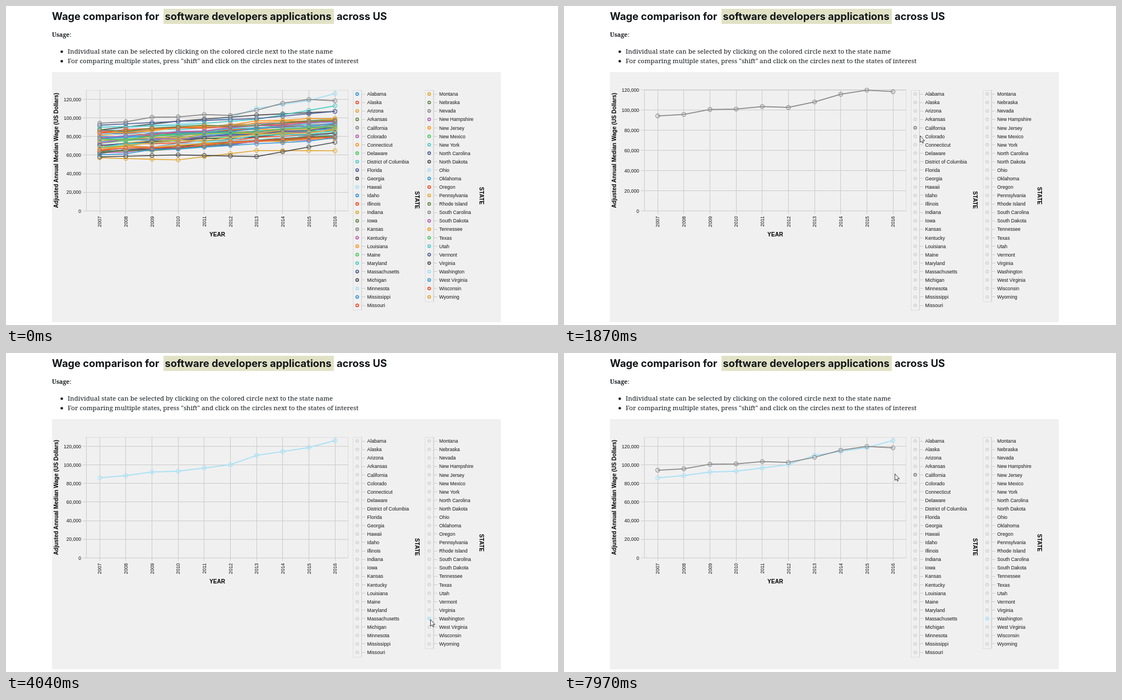
Animation of 985x569 px, one loop 8000 ms. Source, as an HTML page:

```html
<!DOCTYPE html>
<html lang="en">
<head>
<meta charset="utf-8">
<title>Wage comparison</title>
<style>
  html, body { margin: 0; width: 100%; height: 100%; overflow: hidden; background: #fff; }
  svg { display: block; width: 985px; height: 569px; }
  .title { font: 700 18.3px Inter, sans-serif; fill: #111418; }
  .body { font: 11.53px "Noto Serif", serif; fill: #16181c; }
  .usage { font: 700 10.6px "Noto Serif", serif; }
  .label { font: 8.6px "Liberation Sans", Arial, sans-serif; fill: #151515; }
  .axis { font: 700 10px "Liberation Sans", Arial, sans-serif; fill: #000; text-anchor: middle; }
  .end { text-anchor: end; }
  .grid { stroke: #cbcbcb; fill: none; }
  .frame { stroke: #ddd; fill: none; }
</style>
</head>
<body>
<svg viewBox="0 0 985 569">
  <rect x="281" y="5" width="304" height="27" fill="#e1e2c5"/>
  <g class="title">
    <text x="82" y="24.5">Wage comparison for</text>
    <text x="283.5" y="24.5">software developers applications</text>
    <text x="590" y="24.5">across US</text>
  </g>
  <g class="body">
    <text x="82" y="54.5"><tspan class="usage">Usage</tspan>:</text>
    <circle cx="99.5" cy="81.5" r="2.3"/>
    <text x="110" y="84.5">Individual state can be selected by clicking on the colored circle next to the state name</text>
    <circle cx="99.5" cy="98.5" r="2.3"/>
    <text x="110" y="102">For comparing multiple states, press "shift" and click on the circles next to the states of interest</text>
  </g>
  <rect x="82" y="118" width="801" height="446" fill="#f0f0f0"/>
  <g id="static"></g>
  <g id="chart"></g>
  <circle id="click" r="9" fill="#f6ee1c" opacity=".7"/>
  <path id="cursor" d="M.5 .5V12.2L3.1 9.9 4.9 13.7 6.6 12.9 4.9 9.3H8.5Z" fill="#fff" stroke="#222" stroke-width=".9"/>
</svg>
<script>
const STATES = ("Alabama,Alaska,Arizona,Arkansas,California,Colorado,Connecticut,Delaware,District of Columbia," +
  "Florida,Georgia,Hawaii,Idaho,Illinois,Indiana,Iowa,Kansas,Kentucky,Louisiana,Maine,Maryland,Massachusetts," +
  "Michigan,Minnesota,Mississippi,Missouri,Montana,Nebraska,Nevada,New Hampshire,New Jersey,New Mexico,New York," +
  "North Carolina,North Dakota,Ohio,Oklahoma,Oregon,Pennsylvania,Rhode Island,South Carolina,South Dakota," +
  "Tennessee,Texas,Utah,Vermont,Virginia,Washington,West Virginia,Wisconsin,Wyoming").split(",");
const COLORS = ["#3a9ad8", "#f6502f", "#e2ab38", "#66894a", "#8b8b8b", "#b760b4",
  "#f99c27", "#50c963", "#4eccc6", "#52629a", "#505050", "#a4e0f6"];
const color = i => COLORS[i % COLORS.length];
const mix = (a, b, p) => a + (b - a) * p;

// Wages in thousands of dollars at evenly spaced years; the other states are random.
const KEY_WAGES = {
  California: [94.3, 95.8, 100.7, 101.1, 103.6, 102.7, 108.2, 115.8, 119.9, 118.4],
  Washington: [86.1, 88.5, 92.3, 93.2, 96.7, 100.3, 110.3, 114.4, 118.7, 126.2],
  Massachusetts: [92.2, 96.3, 99.3, 107],
  Virginia: [87, 96.5, 103, 107],
  "New York": [90, 92, 98.5, 113],
  "North Dakota": [58, 60.2, 58.4, 73.8],
  Wyoming: [57, 54.8, 64.9, 64.6]
};
const YEARS = Array.from({ length: 10 }, (_, i) => 2007 + i);
let seed = 11;
const random = () => (seed = (seed * 16807) % 2147483647) / 2147483647;

function wages(name) {
  const rank = random();
  const keys = KEY_WAGES[name] || [mix(61, 87, rank), mix(74, 103, mix(rank, random(), .3))];
  const wobble = KEY_WAGES[name] ? 0 : 3.5;
  return YEARS.map((_, i) => {
    const at = i / 9 * (keys.length - 1);
    const k = Math.min(Math.floor(at), keys.length - 2);
    return mix(keys[k], keys[k + 1], at - k) + wobble * (random() - .5);
  });
}
const SERIES = STATES.map(wages);

const LEFT = 143.5, RIGHT = 610.5, TOP = 149.9, BOTTOM = 365.3, ROW = 15.08;
const COLUMNS = [{ x: 619.5, from: 0, to: 26 }, { x: 748, from: 26, to: 51 }];
const yearX = i => 167.2 + i * 46.65;
const rowY = i => 157 + i * ROW;
const crisp = v => Math.floor(v) + .5;
const line = (x1, y1, x2, y2) => `<path class="grid" d="M${x1} ${y1}L${x2} ${y2}"/>`;
const box = (x, y, w, h) => `<rect class="frame" x="${x}" y="${y}" width="${w}" height="${h}"/>`;
const text = (cls, x, y, str, turn = 0) =>
  `<text class="${cls}" transform="translate(${x} ${y}) rotate(${turn})">${str}</text>`;
const ring = (x, y, r, stroke, width) =>
  `<circle cx="${x}" cy="${y}" r="${r}" fill="none" stroke="${stroke}" stroke-width="${width}"/>`;
const byId = id => document.getElementById(id);
const place = (id, x, y) => byId(id).setAttribute("transform", `translate(${x} ${y})`);

function staticParts() {
  let out = box(LEFT, 150.5, RIGHT - LEFT, 215) + line(LEFT, 150, LEFT, 365);
  YEARS.forEach((year, i) => {
    out += line(crisp(yearX(i)), 150, crisp(yearX(i)), 371);
    out += text("label end", yearX(i) + 3.2, 375, year, -90);
  });
  out += text("axis", 93, 257.5, "Adjusted Annual Median Wage (US Dollars)", -90);
  out += text("axis", 377, 410.5, "YEAR");
  out += text("axis", 729.5, 346, "STATE", 90) + text("axis", 844.5, 338.5, "STATE", 90);
  for (const { x, from, to } of COLUMNS) {
    const height = (to - from) * ROW;
    out += box(x, 150.5, 15, height) + line(x + 15, 150, x + 15, 150 + height);
    for (let i = from; i < to; i++) {
      const y = rowY(i - from);
      out += line(x + 15, crisp(y), x + 21.5, crisp(y));
      out += text("label", x + 25, y + 3.2, STATES[i]);
    }
  }
  return out;
}

function chart({ max, picked }) {
  const wageY = v => mix(BOTTOM, TOP, v / max);
  const shown = i => !picked || picked.includes(STATES[i]);
  let out = "", lines = "", points = "";
  for (let v = 0; v <= 120; v += 20) {
    const y = wageY(v);
    out += line(137, crisp(y), RIGHT, crisp(y));
    out += text("label end", 134, y + 3.2, v ? v + ",000" : "0");
  }
  for (let i = STATES.length - 1; i >= 0; i--) {
    if (!shown(i)) continue;
    const spots = SERIES[i].map((v, k) => [yearX(k), wageY(v)]);
    lines += `<polyline points="${spots.join(" ")}" fill="none" stroke="${color(i)}" stroke-width="1.7"/>`;
    points += spots.map(([x, y]) => ring(x, y, 3.5, color(i), 1.4)).join("");
  }
  out += lines + `<g opacity=".85">${points}</g>`;
  for (const { x, from, to } of COLUMNS)
    for (let i = from; i < to; i++)
      out += ring(x + 7.2, rowY(i - from), 2.3, shown(i) ? color(i) : "#d0d0d0", shown(i) ? 1.8 : 1.4);
  return out;
}

const SCENES = [
  { from: 0, max: 130 },
  { from: 1870, max: 120, picked: ["California"] },
  { from: 4040, max: 130, picked: ["Washington"] },
  { from: 7330, max: 130, picked: ["California", "Washington"] }
];
const CLICKS = [{ from: 1720, x: 627, y: 217 }, { from: 3890, x: 755, y: 474 }];
const CLICK_TIME = 150;

// The pointer glides between these stops [tick, x, y] and moves once per tick.
const TICK = 156;
const STOPS = [
  [0, 950, 580], [7, 632, 215], [10, 627, 217], [11, 627, 217], [12, 635, 231],
  [16, 750, 490], [19, 761, 500], [23, 757, 475], [29, 757, 475], [36, 637, 210],
  [38, 635, 194], [41, 627, 223], [45, 625, 219], [48, 625, 219], [51, 590, 215]
];
const ease = p => p * p * (3 - 2 * p);

function pointer(t) {
  const tick = Math.floor((t + 20) / TICK);
  const next = STOPS.findIndex(stop => stop[0] > tick);
  if (next < 0) return STOPS.at(-1).slice(1);
  const [start, x1, y1] = STOPS[next - 1], [end, x2, y2] = STOPS[next];
  const p = ease((tick - start) / (end - start));
  return [mix(x1, x2, p), mix(y1, y2, p)].map(Math.round);
}

byId("static").innerHTML = staticParts();
const views = SCENES.map(chart);
const start = performance.now();
let current = -1;

function draw(now) {
  const t = Math.max(0, now - start) % 8000;
  const scene = SCENES.findLastIndex(s => s.from <= t);
  if (scene !== current) byId("chart").innerHTML = views[current = scene];
  place("cursor", ...pointer(t));
  const click = CLICKS.find(c => t >= c.from && t < c.from + CLICK_TIME) || { x: -50, y: -50 };
  place("click", click.x, click.y);
  requestAnimationFrame(draw);
}
draw(start);
</script>
</body>
</html>
```
